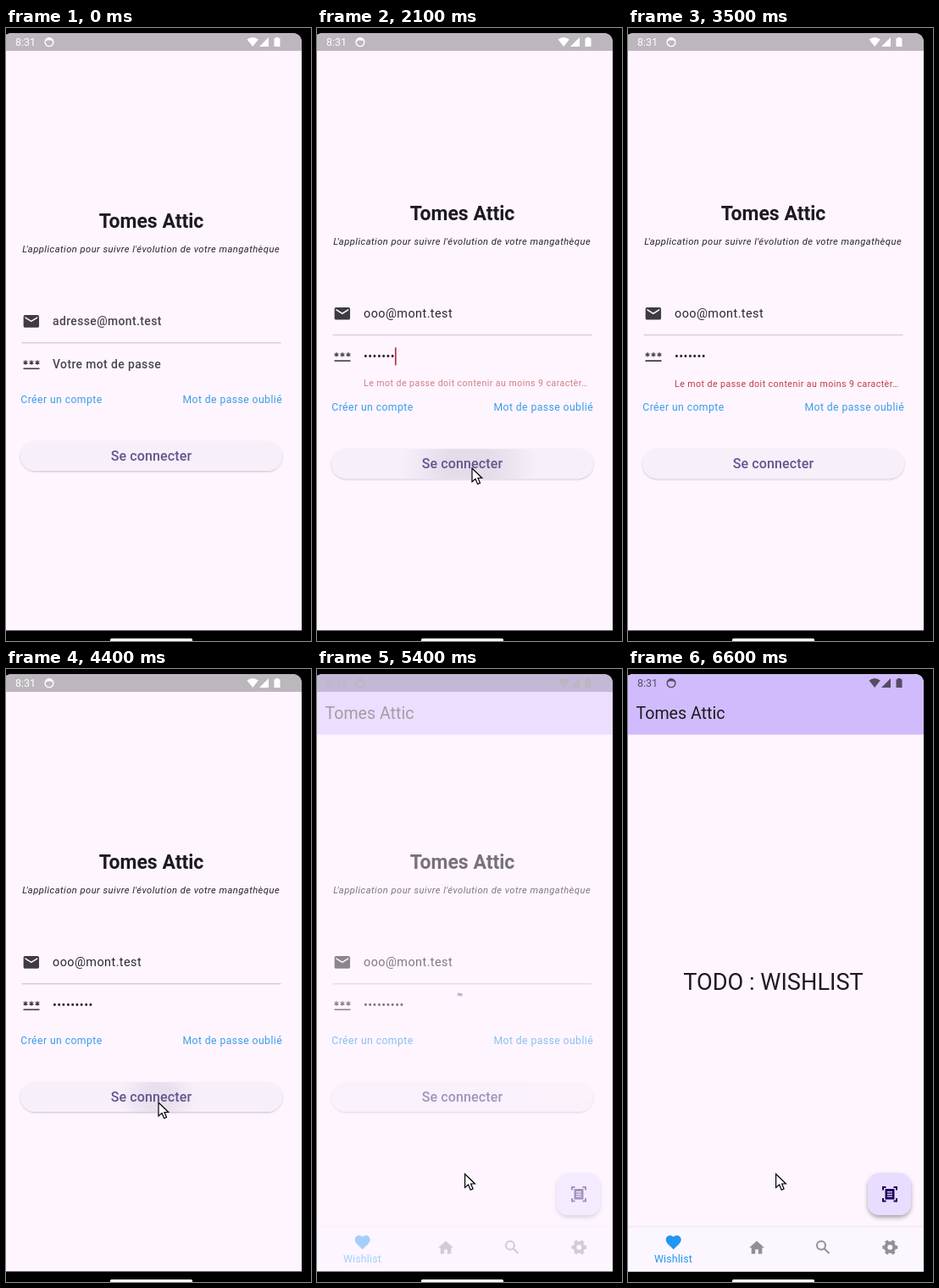
Recreate the animation shown at these times as an HTML page. Size 360x724 px, loop 7.2 s.

```html
<!DOCTYPE html>
<html lang="fr">
<head>
<meta charset="utf-8">
<title>Connexion</title>
<style>
  html, body { margin: 0; height: 100%; overflow: hidden; background: #000; }
  svg { display: block; width: 100vw; height: 100vh; font-family: Roboto, sans-serif; }
  text { white-space: pre; }
  .middle { text-anchor: middle; }
  .heading { font-size: 23px; font-weight: 700; fill: #1d1b20; }
  .subtitle { font-size: 11.2px; font-style: italic; letter-spacing: .46px; fill: #29262c; }
  .hint { font-size: 13.9px; font-weight: 500; letter-spacing: .4px; fill: #49454f; }
  .input { font-size: 14.4px; letter-spacing: .45px; fill: #2b282e; }
  .link { font-size: 12.2px; letter-spacing: .43px; fill: #3a9de6; }
  .error { font-size: 10.6px; letter-spacing: .45px; fill: #bd3b43; }
  .action { font-size: 16px; font-weight: 500; letter-spacing: .12px; fill: #65558f; }
</style>
</head>
<body>
<svg viewBox="0 0 360 724">
  <defs>
    <clipPath id="screen"><path d="M-5 711.6V19Q-5 6 8 6H337Q349 6 349 18V711.6z"/></clipPath>
    <clipPath id="pill"><rect x="17" y="488" width="309" height="35" rx="17.5"/></clipPath>
    <radialGradient id="ink">
      <stop offset=".35" stop-color="#5d5470" stop-opacity=".12"/>
      <stop offset="1" stop-color="#5d5470" stop-opacity="0"/>
    </radialGradient>
    <filter id="shadow" x="-20%" y="-20%" width="140%" height="160%">
      <feDropShadow dx="0" dy="1" stdDeviation=".8" flood-opacity=".22"/>
    </filter>
    <filter id="lift" x="-30%" y="-30%" width="160%" height="170%">
      <feDropShadow dx="0" dy="3" stdDeviation="2.5" flood-opacity=".32"/>
    </filter>
    <path id="star" d="M0-2.7V2.7M-2.4-1.4 2.4 1.4M-2.4 1.4 2.4-1.4" stroke="#3e3b42" stroke-width="1.1"/>
    <g id="status">
      <text x="11" y="21" font-size="12.5">8:31</text>
      <circle cx="51" cy="16.7" r="4.9" fill="none" stroke="currentColor" stroke-width="1.4"/>
      <path d="M46.5 16Q47 11.5 51 11.5T55.5 16L53 14.6H49z"/>
      <path d="M284.5 13.5Q291 8.5 297.8 13.5L291.2 22z"/>
      <path d="M310 11V22H299z"/>
      <path d="M318 11h4v1.3h1.5V22h-7V12.3H318z"/>
    </g>
  </defs>

  <g clip-path="url(#screen)">
    <g id="login">
      <path fill="#fef5ff" d="M-5 0H350V712H-5z"/>
      <path fill="#bdb6be" d="M-5 0H350V27H-5z"/>
      <use href="#status" fill="#fff" color="#fff"/>
      <g id="upper">
        <text class="heading middle" x="171.5" y="236">Tomes Attic</text>
        <text class="subtitle" x="19.3" y="265">L'application pour suivre l'évolution de votre mangathèque</text>
        <path fill="#3e3b42" transform="translate(18.8 335.4) scale(.92)" d="M20 4H4Q2 4 2 6V18Q2 20 4 20H20Q22 20 22 18V6Q22 4 20 4zM20 8 12 13 4 8V6L12 11 20 6z"/>
        <text class="hint" id="emailHint" x="55" y="351">adresse@mont.test</text>
        <text class="input" id="email" x="55" y="351"></text>
        <path d="M18.5 371.7H324.5" stroke="#d6ced8" stroke-width="1.5"/>
        <use href="#star" x="23" y="395"/><use href="#star" x="30" y="395"/><use href="#star" x="37" y="395"/>
        <path d="M20.5 402.3H39.5" stroke="#3e3b42" stroke-width="1.6"/>
        <text class="hint" id="passwordHint" x="55" y="402">Votre mot de passe</text>
        <text class="input" id="password" x="55" y="402"></text>
        <rect id="caret" width="1.7" height="21"/>
      </g>
      <text class="error" id="error" x="55" y="424">Le mot de passe doit contenir au moins 9 caractèr…</text>
      <g id="lower">
        <text class="link" x="17.3" y="443">Créer un compte</text>
        <text class="link" x="208.5" y="443">Mot de passe oublié</text>
        <rect x="17" y="488" width="309" height="35" rx="17.5" fill="#f7effa" filter="url(#shadow)"/>
        <g clip-path="url(#pill)"><circle id="ripple" cx="180" cy="506" fill="url(#ink)"/></g>
        <text class="action middle" x="171.5" y="511">Se connecter</text>
      </g>
    </g>

    <g id="home">
      <path fill="#fef5ff" d="M-5 0H350V712H-5z"/>
      <path fill="#d0bbfc" d="M-5 0H350V77.5H-5z"/>
      <use href="#status" fill="#544c66" color="#544c66"/>
      <text x="9.5" y="58.5" font-size="19.6" fill="#1d1b20">Tomes Attic</text>
      <path id="spinner" fill="none" stroke="#65558f" stroke-width="3.5"/>
      <text class="middle" id="todo" x="171.5" y="378.5" font-size="27.2" fill="#1d1b20">TODO : WISHLIST</text>
      <rect x="283" y="595" width="51" height="50" rx="14" fill="#e9ddff" filter="url(#lift)"/>
      <g fill="none" stroke="#21005d" stroke-width="2">
        <path d="M301 615.5V612H304.5M313.5 612H317V615.5M317 625V628.5H313.5M304.5 628.5H301V625"/>
        <path fill="#21005d" d="M304.5 615H313.5V625.5H304.5z"/>
        <path stroke="#e9ddff" stroke-width="1.3" d="M306 617.7H312M306 620.3H312M306 622.9H312"/>
      </g>
      <path fill="#fcf6ff" d="M-5 659H350V712H-5z"/>
      <path d="M-5 658.7H350" stroke="#ebe4ee"/>
      <path fill="#2196f3" transform="translate(42.9 666.2) scale(.9)" d="M12 21.35 10.55 20.03C5.4 15.36 2 12.28 2 8.5 2 5.42 4.42 3 7.5 3 9.24 3 10.91 3.81 12 5.09 13.09 3.81 14.76 3 16.5 3 19.58 3 22 5.42 22 8.5 22 12.28 18.6 15.36 13.45 20.04z"/>
      <text class="middle" x="53.5" y="701" font-size="12.3" letter-spacing=".2" fill="#2196f3">Wishlist</text>
      <path fill="#929095" transform="translate(141.2 672.8) scale(.9)" d="M10 20V14H14V20H19V12H22L12 3 2 12H5V20z"/>
      <g fill="none" stroke="#929095" stroke-width="2">
        <circle cx="228" cy="680.7" r="5"/>
        <path d="M231.5 684.2 237.5 690.2"/>
        <circle cx="309.3" cy="683" r="5" stroke-width="4"/>
        <circle cx="309.3" cy="683" r="7.7" stroke-width="2.6" pathLength="12" stroke-dasharray="1" transform="rotate(-15 309.3 683)"/>
      </g>
    </g>
  </g>

  <path fill="#fff" d="M123 724V722.5Q123 721 124.5 721H218.5Q220 721 220 722.5V724z"/>
  <path id="pointer" fill="#fff" stroke="#000" stroke-width="1.2" d="M0 0V16L4 12.5 6.6 18.7 9.5 17.4 7 11.5H11.8z"/>
</svg>

<script>
const LOOP = 7200, STEP = 100;
const EMAIL = "ooo@mont.test";
const el = Object.fromEntries([...document.querySelectorAll("[id]")].map(e => [e.id, e]));
const set = (e, attrs) => { for (const k in attrs) e.setAttribute(k, attrs[k]); };
const show = (e, on) => set(e, { visibility: on ? "visible" : "hidden" });
const within = (t, from, to) => t >= from && t < to;

// Linear interpolation through [time, value] keys
function track(t, ...keys) {
  if (t <= keys[0][0]) return keys[0][1];
  for (let i = 1; i < keys.length; i++) {
    const [t0, a] = keys[i - 1], [t1, b] = keys[i];
    if (t < t1) return a + (b - a) * (t - t0) / (t1 - t0);
  }
  return keys.at(-1)[1];
}

function typeFields(t, failed) {
  const letters = Math.round(track(t, [300, 0], [600, EMAIL.length]));
  const dots = Math.floor(track(t, [600, 0], [1000, 7], [3700, 7], [3900, 9]));
  el.email.textContent = EMAIL.slice(0, letters);
  el.password.textContent = "•".repeat(dots);
  show(el.emailHint, !letters);
  show(el.passwordHint, !dots);

  const inEmail = t < 700;
  const field = inEmail ? el.email : el.password;
  set(el.caret, {
    x: 54.8 + field.getComputedTextLength(),
    y: inEmail ? 336 : 386.5,
    fill: failed ? "#b3333a" : "#65558f"
  });
  show(el.caret, within(t, 100, 1600) || within(t, 2000, 3200) || within(t, 3700, 4400));
}

function drawLogin(t) {
  const failed = within(t, 2000, 4400);
  const shift = failed ? 9.2 : 0;
  typeFields(t, failed);
  set(el.upper, { transform: `translate(0 ${-shift})` });
  set(el.lower, { transform: `translate(0 ${shift})` });

  const fade = failed ? track(t, [1900, 0], [2100, .65], [2300, 1]) : 0;
  set(el.error, { opacity: fade, y: 424.2 - 4 * (1 - fade) });

  const press = t - (t < 4400 ? 2000 : 4400);
  set(el.ripple, {
    r: track(press, [0, 45], [100, 80], [400, 180]),
    opacity: within(press, 0, 600) ? track(press, [0, .8], [100, 1], [600, 0]) : 0
  });
}

function drawSpinner(t) {
  const tail = track(t, [5400, 90], [5600, 150], [5800, 160], [6100, 440], [6200, 510]);
  const head = track(t, [5400, 110], [5600, 200], [5800, 380], [6100, 540], [6200, 545]);
  const point = deg => {
    const a = deg * Math.PI / 180;
    return `${171.5 + 16.3 * Math.cos(a)} ${368.5 + 16.3 * Math.sin(a)}`;
  };
  set(el.spinner, { d: `M${point(tail)}A16.3 16.3 0 ${+(head - tail > 180)} 1 ${point(head)}` });
}

function drawHome(t) {
  set(el.home, { opacity: track(t, [5300, 0], [5400, .4], [5500, .85], [5600, 1]) });
  drawSpinner(t);
  show(el.spinner, t < 6400);
  show(el.todo, t >= 6400);
}

function drawPointer(t) {
  const x = track(t, [1200, 165.6], [1600, 235], [1700, 235], [1800, 190], [1900, 190], [2000, 183],
    [2800, 183], [3200, 192], [3900, 200], [4200, 180], [4700, 180], [5100, 174.6]);
  const y = track(t, [1200, 585.5], [1600, 487], [1700, 487], [1800, 482], [1900, 482], [2000, 520],
    [2800, 520], [3200, 730], [3900, 730], [4200, 512], [4700, 512], [5100, 596.5]);
  set(el.pointer, { transform: `translate(${x} ${y})` });
  show(el.pointer, t >= 1200);
}

function draw() {
  const t = Math.floor(performance.now() % LOOP / STEP) * STEP;
  drawLogin(t);
  drawHome(t);
  drawPointer(t);
  requestAnimationFrame(draw);
}
draw();
</script>
</body>
</html>
```
